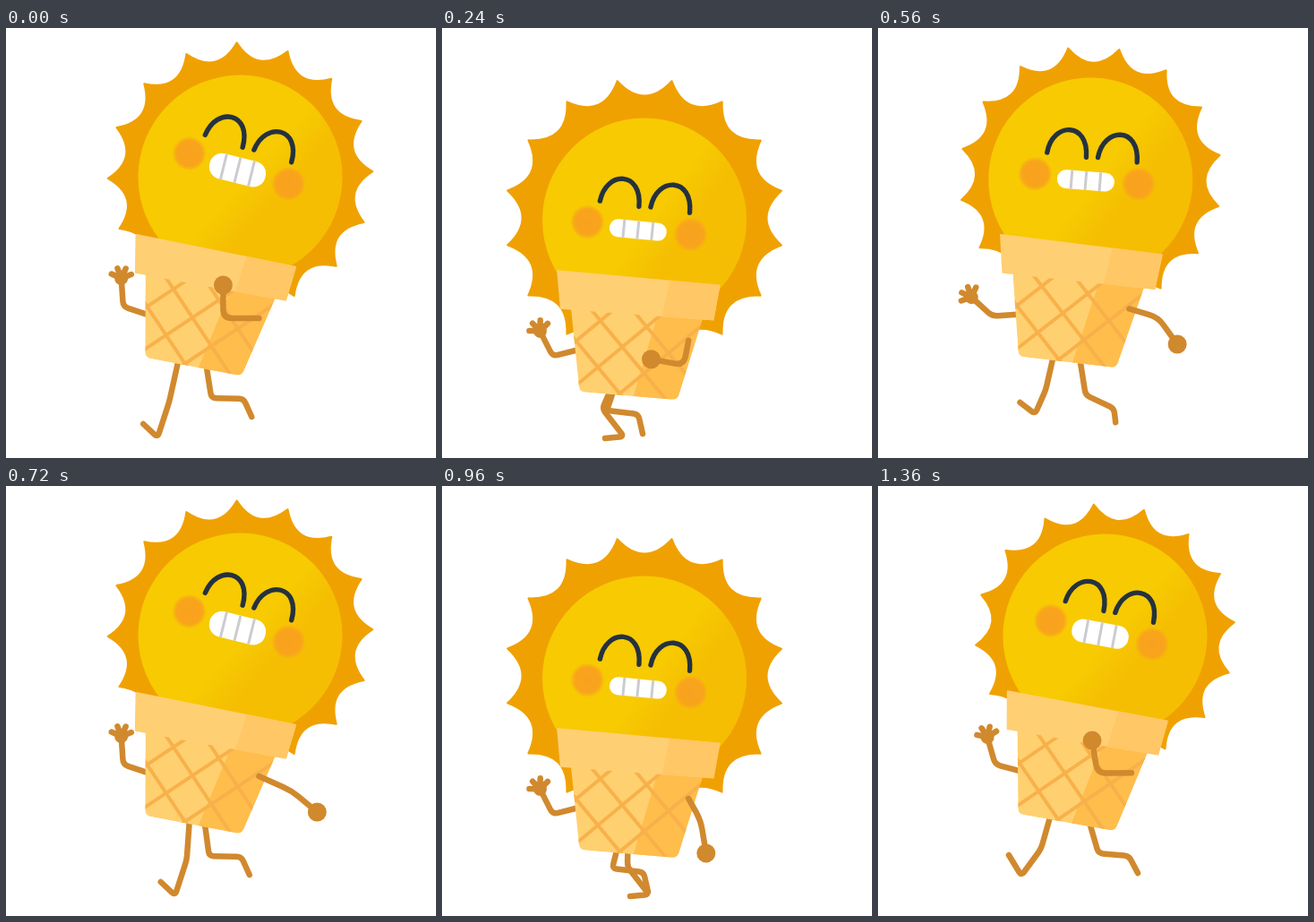
Recreate the animation shown at these times as an HTML page. Size 480 by 480 pixels, loop 1440 ms.

```html
<!DOCTYPE html>
<html lang="en">
<head>
<meta charset="utf-8">
<title>Sunny cone stroll</title>
<style>
html, body { margin: 0; width: 100%; height: 100%; overflow: hidden; background: #fff; }
svg { display: block; width: 100vw; height: 100vh; }
.limb { fill: none; stroke: #d1892e; stroke-width: 6.5; stroke-linecap: round; stroke-linejoin: round; }
.eye { fill: none; stroke: #25323e; stroke-width: 5.4; stroke-linecap: round; }
</style>
</head>
<body>
<svg viewBox="0 0 480 480">
  <defs>
    <linearGradient id="disc" gradientUnits="userSpaceOnUse" x1="12" y1="-8" x2="46" y2="12">
      <stop offset="0" stop-color="#f7ca02"/>
      <stop offset="1" stop-color="#f5be02"/>
    </linearGradient>
    <radialGradient id="blush">
      <stop offset="0" stop-color="#f9a11f"/>
      <stop offset=".78" stop-color="#f9a41c"/>
      <stop offset="1" stop-color="#f9a81a" stop-opacity=".25"/>
    </radialGradient>
    <clipPath id="waffle"><path d="M-73 36 76 36 57 125Q56 132 49 132L-48 133Q-54 133-55 127Z"/></clipPath>
    <clipPath id="lips"><rect id="lipsBox" x="-32" width="64"/></clipPath>
  </defs>
  <path id="legB" class="limb"/>
  <path id="legA" class="limb"/>
  <path id="armL" class="limb"/>
  <g id="hand">
    <circle r="7.5" fill="#d1892e"/>
    <path id="fingers" class="limb"/>
  </g>
  <path id="rays" fill="#f0a102" stroke="#f0a102" stroke-width="2" stroke-linejoin="round"/>
  <g id="head"><circle r="114" fill="url(#disc)"/></g>
  <g id="face">
    <circle cx="-58" r="18.5" fill="url(#blush)"/>
    <circle cx="58" r="18.5" fill="url(#blush)"/>
    <path class="eye" d="M-47-25C-44-60-4-64-3-24M10-25C13-60 53-64 54-24"/>
    <g id="mouth">
      <rect id="lipsFill" x="-32" width="64" fill="#fff"/>
      <path clip-path="url(#lips)" d="M-16-18-16 18M0-18 0 18M16-18 16 18" stroke="#cbcbd0" stroke-width="3"/>
    </g>
  </g>
  <g id="cone">
    <g clip-path="url(#waffle)">
      <rect x="-75" y="34" width="152" height="101" fill="#ffd070"/>
      <path d="M26 34 80 34 80 135 6 135Z" fill="#ffbd4c"/>
      <path id="lattice" fill="none" stroke="#f8b14a" stroke-width="4"/>
    </g>
    <path d="M-90.5 1 90.5 1 87 39-83 42Z" fill="#ffcf74" stroke="#ffcf74" stroke-width="2" stroke-linejoin="round"/>
    <path d="M35 0 91 0 88 40 30 41Z" fill="#ffc765"/>
  </g>
  <path id="armR" class="limb"/>
  <circle id="fist" r="10.5" fill="#d1892e"/>
</svg>
<script>
const STEP = 80, BOUNCE = 9, LOOP = 18;
const $ = id => document.getElementById(id);
const rad = a => a * Math.PI / 180;

// One leg's cycle: step, then knee, heel and toe.
const STRIDE = [
  [0, 192, 417, 179, 457, 163, 442],
  [3, 193, 425, 217, 456, 196, 458],
  [5, 223, 412, 250, 450, 234, 458],
  [8, 242, 410, 276, 413, 286, 432],
  [9, 228, 413, 264, 414, 273, 434],
  [12, 187, 427, 222, 431, 227, 453],
  [14, 174, 408, 189, 430, 169, 442],
  [17, 189, 405, 167, 435, 153, 412]
];

// Two harmonics around a mean; t in degrees.
const wave = (t, mean, c1, s1, s2 = 0, c2 = 0) =>
  mean + c1 * Math.cos(rad(t)) + s1 * Math.sin(rad(t)) +
  s2 * Math.sin(rad(2 * t)) + c2 * Math.cos(rad(2 * t));

// Smooth periodic curve through the keys.
function at(keys, step, period) {
  const n = keys.length, k = step % period;
  const key = j => keys[(j + n) % n];
  const when = j => key(j)[0] + period * Math.floor(j / n);
  let i = n - 1;
  while (keys[i][0] > k) i--;
  const t0 = when(i), span = when(i + 1) - t0, u = (k - t0) / span;
  const slope = (j, c) => (key(j + 1)[c] - key(j - 1)[c]) / (when(j + 1) - when(j - 1)) * span;
  return key(i).slice(1).map((a, j) => {
    const c = j + 1, b = key(i + 1)[c];
    return a + (b - a) * u * u * (3 - 2 * u) +
      slope(i, c) * u * (1 - u) ** 2 - slope(i + 1, c) * u * u * (1 - u);
  });
}

const polar = ([x, y], r, a) => [x + r * Math.cos(rad(a)), y + r * Math.sin(rad(a))];

// Polyline with softly rounded joints.
function bend(p, r) {
  const near = (a, b) => {
    const f = Math.min(.5, r / (Math.hypot(b[0] - a[0], b[1] - a[1]) || 1));
    return [a[0] + (b[0] - a[0]) * f, a[1] + (b[1] - a[1]) * f];
  };
  let d = "M" + p[0];
  for (let i = 1; i < p.length - 1; i++)
    d += "L" + near(p[i], p[i - 1]) + "Q" + p[i] + " " + near(p[i], p[i + 1]);
  return d + "L" + p[p.length - 1];
}

function rays(x, y, r, spin) {
  let d = "M" + polar([x, y], r, spin - 90);
  for (let i = 1; i <= 16; i++) {
    const a = spin - 90 + i * 22.5;
    d += "Q" + polar([x, y], r * .77, a - 11.25) + " " + polar([x, y], r, a);
  }
  return d + "Z";
}

const place = (id, x, y, a = 0) => $(id).setAttribute("transform", `translate(${x} ${y}) rotate(${a})`);
const trace = (id, d) => $(id).setAttribute("d", d);

// Both legs share the stride; the far one lands a little further back.
function leg(id, s, side, base) {
  const shift = side * wave(20 * (s - 3), 5.5, 8.5, 0);
  const [kx, ky, hx, hy, tx, ty] = at(STRIDE, s, LOOP);
  const knee = [kx + shift, ky];
  const hip = [base[0] + .6 * (knee[0] - base[0]), base[1]];
  trace(id, bend([hip, knee, [hx + shift, hy], [tx + shift, ty]], 5));
}

function draw(s) {
  const t = 360 * s / BOUNCE, w = (...c) => wave(t, ...c);

  const x = w(236, 25.5, 3.2), y = w(183.3, -19.3, 15.5, -6.5);
  const lean = w(6.6, 4.8, .55, -.7), tilt = w(7.6, 9.4, 3.9, -.7);
  const cx = w(224, 10.5, -.7, -1.5), cy = w(256.3, -8.3, 15.6, -5.2);
  const onCone = (a, b) => polar(polar([cx, cy], a, lean), b, lean + 90);

  trace("rays", rays(x, y, w(151.5, -3.7, 4.1, 1.2), 5 * (s % BOUNCE) + w(-2, .5, -2, -.3)));
  place("head", x, y + 2.5, lean);
  place("face", x + w(-3.6, 2.1, .3, 1.85), y + w(2.7, -9.7, .8, -3.8), tilt);
  place("mouth", -1, 2, -tilt * .18);
  const grin = w(21.7, 7.3, 2.2);
  for (const id of ["lipsBox", "lipsFill"]) {
    const box = $(id);
    box.setAttribute("y", -grin / 2);
    box.setAttribute("height", grin);
    box.setAttribute("rx", grin * .48);
  }
  place("cone", cx, cy, lean);

  const base = onCone(0, 120);
  leg("legA", s, -1, base);
  leg("legB", s + BOUNCE, 1, base);

  // Waving arm, behind the cone
  const fore = w(234, 32.2, 20.4, -8.8);
  const elbowL = polar(onCone(-64, 86), 25.5, w(169, 31, 3.3, -5.5));
  const palm = polar(elbowL, 31.5, fore);
  trace("armL", bend([onCone(-58, 86), elbowL, palm], 6));
  place("hand", ...palm, fore + 10);

  // Swinging arm, in front; once per two steps
  const h = t / 2, shoulder = onCone(62, 65);
  const elbowR = polar(shoulder, wave(h, 32, 0, 0, 0, 8), wave(h, 88, 78, -22, 0, 14));
  const fist = polar(elbowR, 37, wave(h, 142, 115, -3, 0, 13));
  trace("armR", bend([shoulder, elbowR, fist], 10));
  place("fist", ...fist);
}

trace("fingers", [-72, -27, 18, 62].map(a => "M0 0L" + polar([0, 0], 12, a)).join(""));
trace("lattice", [-1, 0, 1].map(i => {
  const down = 90 - 50 * i, up = 68 + 54 * i;
  return `M-80 ${down - 80}L80 ${down + 80}M-80 ${up + 80}L80 ${up - 80}`;
}).join(""));

let start = null;
function tick(now) {
  if (start === null) start = now;
  draw(Math.floor((now - start) / STEP) % LOOP);
  requestAnimationFrame(tick);
}
draw(0);
requestAnimationFrame(tick);
</script>
</body>
</html>
```
